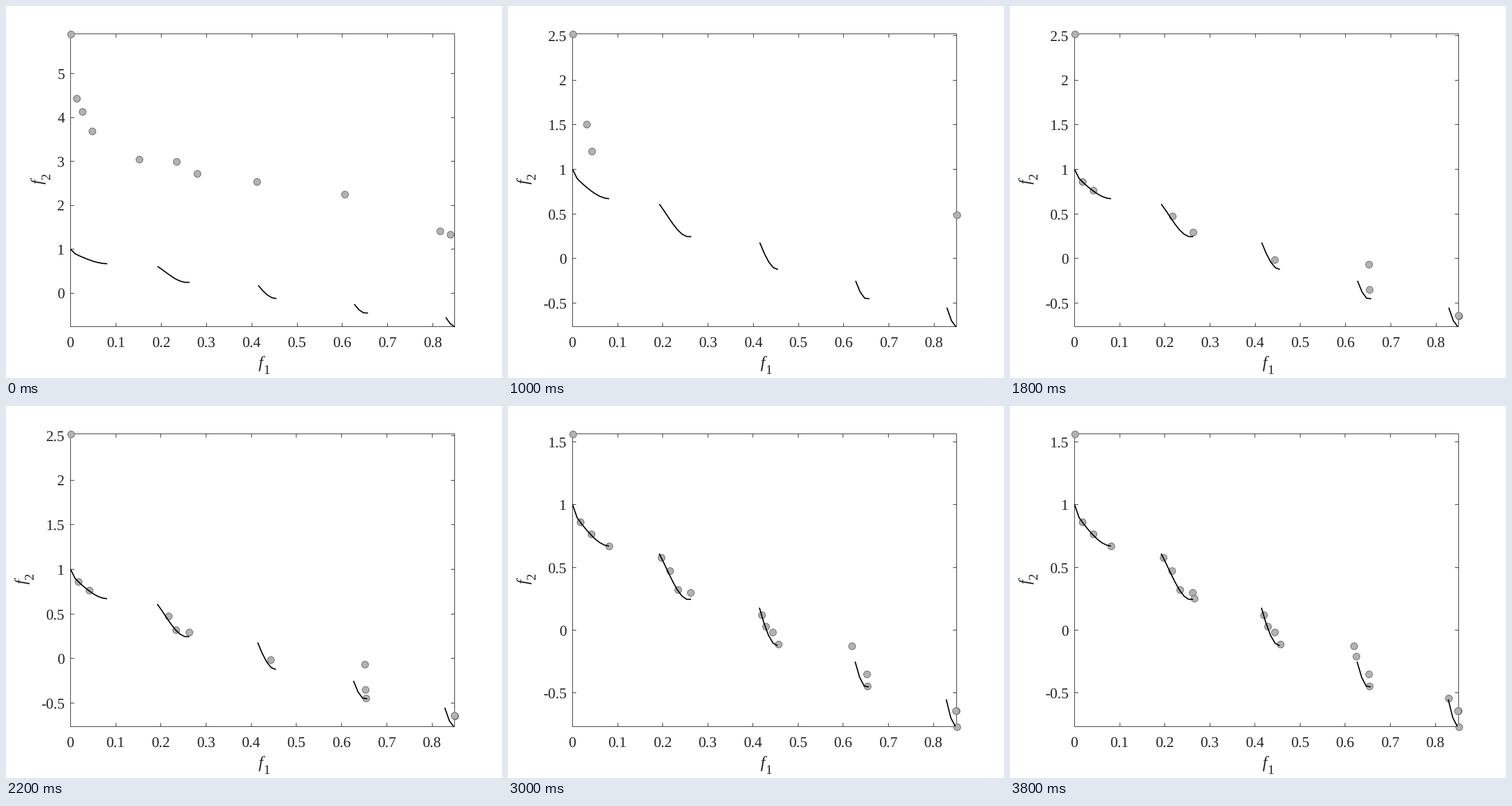
Animation, 864 px wide and 648 px high, one loop 4 s. Source, as a matplotlib script:

```python
import math

import matplotlib.pyplot as plt
import numpy as np
from matplotlib.animation import FuncAnimation

plt.rcParams["font.family"] = "Liberation Serif"
plt.rcParams["text.hinting"] = "none"

W, H = 864, 648
LEFT, RIGHT, TOP, BOTTOM = 112.5, 781.5, 48.5, 558.5
INK = "#262626"
TICK = 6.5
FONT = 26


def tradeoff(f1, g=1):
    """Second objective of the test problem; g = 1 is the optimal front."""
    return g - np.sqrt(f1 * g) - f1 * np.sin(10 * np.pi * f1)


def streak(p, q, n, ease=1.3):
    """n solutions from p to q, closer together near p."""
    p, q = np.array(p), np.array(q)
    return [tuple(p + (q - p) * (i / (n - 1)) ** ease) for i in range(n)]


def near_front(gen, *f1s):
    """Solutions whose distance from the front drops as the search settles."""
    slack = .27 if gen < 7 else .03
    return [(f1, tradeoff(f1, 1 + slack * f1)) for f1 in f1s]


descent = streak((.0311, 1.503), (.0591, .769), 3)

# Solutions found by each generation.
FOUND = {
    0: [(0, 5.904)]
       + streak((.0127, 4.44), (.0469, 3.682), 3)
       + streak((.1515, 3.054), (.2333, 2.995), 2)
       + streak((.2795, 2.721), (.6054, 2.257), 3)
       + streak((.8152, 1.414), (.838, 1.335), 2),
    1: [(0, 2.521)] + streak((.1978, 1.548), (.7968, 1.322), 3, 2.5),
    2: descent[:2],
    3: [(.8505, .491)],
    4: descent[2:] + [(.8504, .562)],
    5: near_front(5, .0174, .2163, .4429, .6522, .8508),
    6: near_front(6, .0414, .2621, .8495) + [(.6507, -.0665)],
    7: near_front(7, .2329, .6535),
    8: near_front(8, .4562) + [(.015, 1.984), (.852, -.772)],
    9: near_front(9, .0802, .197, .4193),
    10: near_front(10, .4276, .6191) + [(0, 1.565)],
    12: near_front(12, .2647),
    13: near_front(13, .6242, .8285),
}

# The front is drawn from the grid cells that lie on its separate runs.
grid = np.linspace(0, 1, 100)
RUNS = [grid[a:b + 1] for a, b in
        [(0, 8), (19, 26), (41, 45), (62, 65), (82, 84)]]
CORNER = grid[84], tradeoff(grid[84])


def dominates(p, q):
    return p != q and p[0] <= q[0] and p[1] <= q[1]


def archive(gen):
    found = [p for g, new in FOUND.items() if g <= gen for p in new]
    return [q for q in found if not any(dominates(p, q) for p in found)]


fig = plt.figure(figsize=(W / 72, H / 72), dpi=72, facecolor="white")
ax = fig.add_axes([0, 0, 1, 1])


def line(x, y, color=INK, lw=1, z=1):
    ax.plot(x, y, color=color, lw=lw, zorder=z, snap=False,
            solid_capstyle="butt", solid_joinstyle="miter")


def text(x, y, s, ha="left", size=FONT, **kw):
    ax.text(x, y, s, ha=ha, va="baseline", size=size, color=INK,
            rotation_mode="anchor", **kw)


def crisp(v):
    return math.floor(v) + .5


def draw(tick):
    ax.clear()
    ax.set(xlim=(0, W), ylim=(H, 0))
    ax.axis("off")

    # three generations pass in every four ticks
    points = np.array(archive(max(0, (3 * tick - 3) // 4)))
    xmax = max(points[:, 0].max(), CORNER[0])
    ymin = min(points[:, 1].min(), CORNER[1])
    ymax = points[:, 1].max()

    def px(v):
        return LEFT + v / xmax * (RIGHT + .5 - LEFT)

    def py(v):
        return BOTTOM + .5 - (v - ymin) / (ymax - ymin) * (BOTTOM + .5 - TOP)

    line([LEFT, RIGHT, RIGHT, LEFT, LEFT], [TOP, TOP, BOTTOM, BOTTOM, TOP])

    for k in range(9):
        x = px(k / 10)
        for edge, inward in (BOTTOM, -TICK), (TOP, TICK):
            line([crisp(x)] * 2, [edge, edge + inward])
        text(x - .5, 594, f"{k / 10:g}", ha="center")

    step = 1 if ymax > 3 else .5
    for k in range(math.ceil(ymin / step), math.floor(ymax / step) + 1):
        y = py(k * step)
        for edge, inward in (LEFT, TICK), (RIGHT, -TICK):
            line([edge, edge + inward], [crisp(y)] * 2)
        text(102, y + 9, f"{k * step:g}", ha="right")

    text(439.5, 630, "f", size=29, style="italic")
    text(448.5, 641, "1", size=23)
    base = 64 if step == 1 else 35.5
    text(base, 310, "f", size=29, style="italic", rotation=90)
    text(base + 12.5, 301.5, "2", size=23, rotation=90)

    ax.plot(px(points[:, 0]), py(points[:, 1]), "o", ms=12, mew=1,
            mfc="#b2b2b2", mec="#666666", zorder=3, snap=False)
    for run in RUNS:
        line(px(run), py(tradeoff(run)), "black", 2, 4)
    return []


anim = FuncAnimation(fig, draw, frames=20, interval=200, repeat=True,
                     repeat_delay=0, init_func=lambda: [], blit=False)
plt.show()
```
